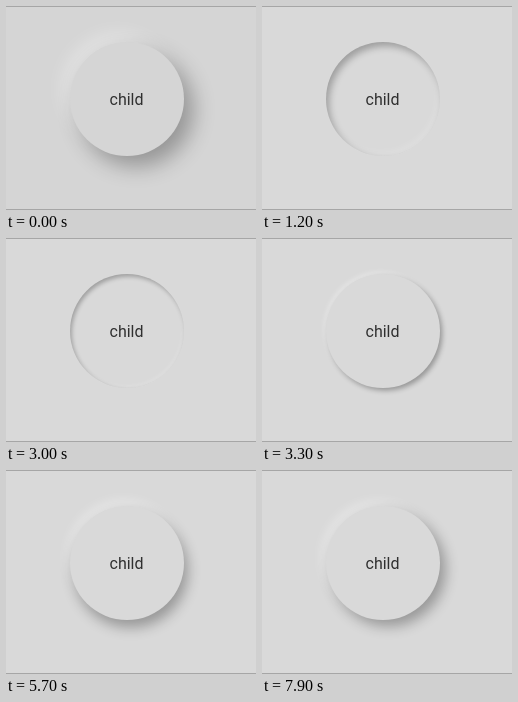
Write an HTML page that moves like this. It is 250 px wide and 204 px high and loops after 8000 ms.

```html
<!DOCTYPE html>
<html lang="en">
<head>
<meta charset="utf-8">
<title>Soft button</title>
<style>
  html, body { margin: 0; width: 100%; height: 100%; overflow: hidden; }
  #stage {
    position: relative; width: 250px; height: 204px; box-sizing: border-box;
    border: solid #a6a6a6; border-width: 1px 0; background: #d9d9d9;
  }
  #button {
    position: absolute; left: 64px; top: 35px; width: 114px; height: 114px;
    border-radius: 50%; background: inherit; color: #303030;
    font: 16px/116px Roboto, sans-serif; text-align: center; text-indent: -1px;
  }
</style>
</head>
<body>
<div id="stage"><div id="button">child</div></div>
<script>
const LOOP = 8000;
const TICK = 100;
const stage = document.getElementById('stage');
const button = document.getElementById('button');

// [ms, depth]; the button is pressed in where depth is negative
const keys = [
  [0, 14], [600, 14], [1400, -11.5], [1600, -13],
  [2900, -13], [3000, -3], [3500, 8], [3700, 8.5], [LOOP, 8.5]
];

function depthAt(time) {
  const i = keys.findIndex(([end]) => end > time);
  const [t0, d0] = keys[i - 1];
  const [t1, d1] = keys[i];
  return d0 + (d1 - d0) * (time - t0) / (t1 - t0);
}

// Direction of the shadow in degrees, clockwise from the right
function angleAt(time, depth) {
  if (depth < 0) return 54;
  return time >= 5700 && time < 7300 ? 63 : 48;
}

function shadow(depth, degrees) {
  const inset = depth < 0 ? 'inset ' : '';
  const size = Math.abs(depth);
  const angle = degrees * Math.PI / 180;
  const x = size * Math.cos(angle);
  const y = size * Math.sin(angle);
  const dark = inset ? 0.27 : 0.3;
  const light = inset ? 0.15 : 0.27;
  return `${inset}${x}px ${y}px ${size * 1.5}px rgba(0,0,0,${dark}),
    ${inset}${-x}px ${-y}px ${size * 1.15}px rgba(255,255,255,${light})`;
}

function draw(now) {
  const time = Math.floor(now % LOOP / TICK) * TICK;
  const depth = depthAt(time);
  button.style.boxShadow = shadow(depth, angleAt(time, depth));
  stage.style.backgroundColor = time < 700 ? '#d5d5d5' : '#d9d9d9';
  requestAnimationFrame(draw);
}
draw(0);
</script>
</body>
</html>
```
